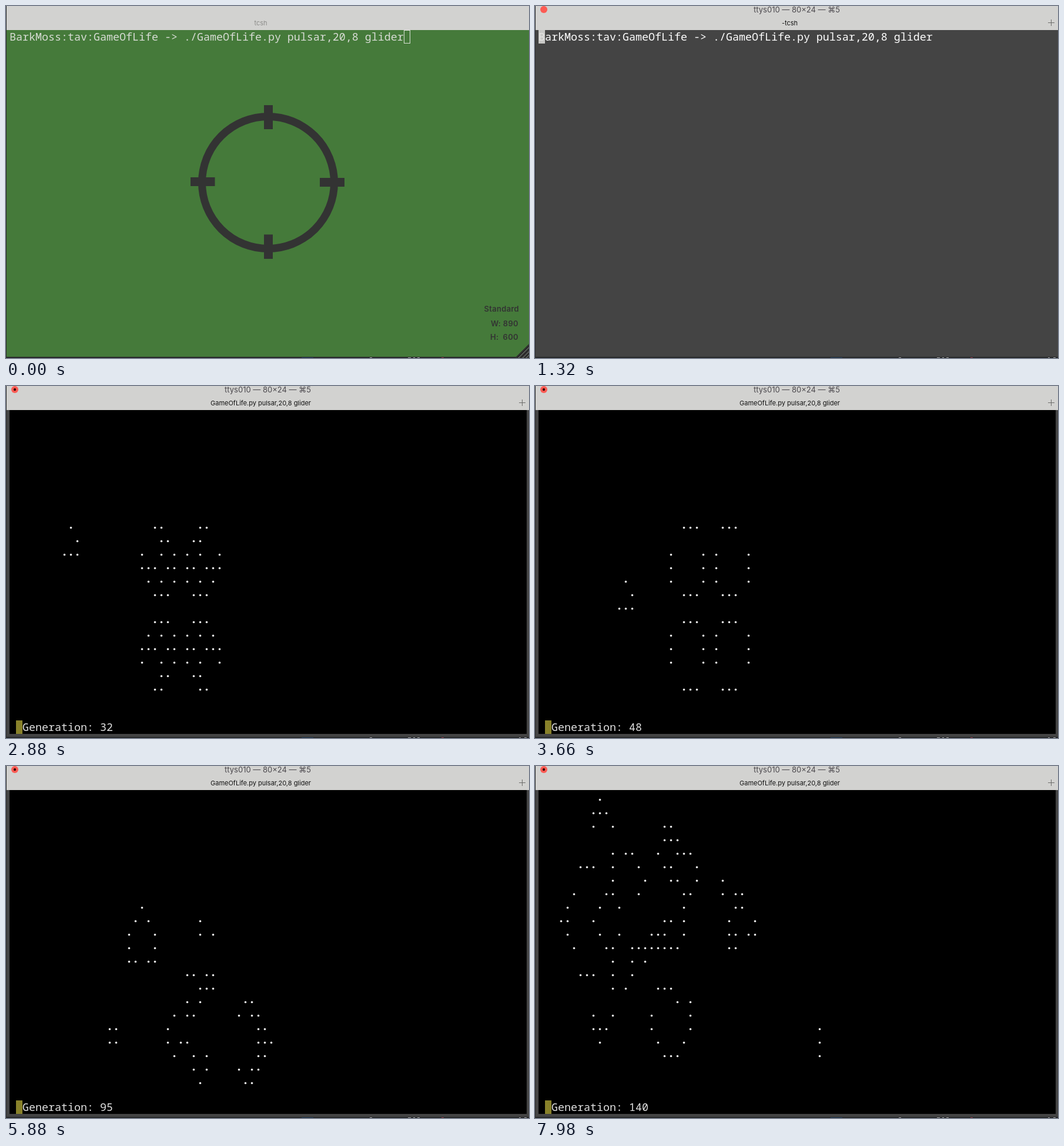
Write an HTML page that moves like this. It is 890 px wide and 600 px high and loops after 8000 ms.

```html
<!DOCTYPE html>
<html lang="en">
<head>
<meta charset="utf-8">
<title>Game of Life in a terminal</title>
<style>
  html, body { margin: 0; width: 100%; height: 100%; overflow: hidden; background: #444; }
  svg { display: block; width: 890px; height: 600px; }
  .mono { font: 500 18.333px "Noto Sans Mono", monospace; fill: #fff; }
  .ui { font: 400 11px Inter, sans-serif; text-anchor: middle; fill: #111; }
  .size { font: 600 13px Inter, sans-serif; text-anchor: end; fill: #333; letter-spacing: .3px; }
  #cells { fill: none; stroke: #e6e6e6; stroke-width: 3.7; stroke-linecap: round; }
  #title { font-size: 13px; fill: #4c494e; }
  .idle #title { fill: #a9a9a7; }
  .idle #tab { fill: #8b8b88; }
</style>
</head>
<body>
<svg id="stage" viewBox="0 0 890 600">
  <rect width="890" height="600" fill="#444"/>
  <rect id="green" width="890" height="600" fill="#457a3a"/>
  <rect y="598" width="890" height="2" fill="#26282a"/>
  <path d="M503 599.5h20" stroke="#24405f"/>
  <path d="M619 599.5h4M684 599.5h5m4 0h3m4 0h4M873 599.5h3m6 0h4" stroke="#aaa"/>
  <path d="M741 599.5h4" stroke="#963c4b"/>
  <rect width="1" height="600" fill="#292a29"/>
  <rect x="1" width="889" height="41" fill="#d2d2d0"/>

  <g id="bar">
    <text id="title" class="ui" x="445.500" y="11">ttys010 — 80×24 — ⌘5</text>
    <path d="M873 28.500h11M878.500 23v11" stroke="#6c6c6a"/>
  </g>
  <g id="light">
    <circle cx="15" cy="6" r="6" fill="#fc5b54"/>
    <circle id="busy" cx="15" cy="6" r="2.200" fill="#3d0704"/>
  </g>
  <text id="tab" class="ui" x="433.500" y="33"></text>

  <g id="overlay">
    <circle cx="446" cy="301" r="112.500" fill="none" stroke="#333" stroke-width="13"/>
    <path d="M439 169h15v41h-15zM439 389.500h15v41.500h-15zM314 292h41.500v15h-41.500zM534 293h42v15h-42z" fill="#333"/>
    <text class="size" x="873" y="521">Standard</text>
    <text class="size" x="872" y="546">W: 890</text>
    <text class="size" x="872" y="569">H:&#160; 600</text>
    <path d="M866 600l24-24v24z" fill="#2d2d2d"/>
    <path d="M872 600l18-18M879 600l11-11M885 600l5-5" stroke="#8a938a"/>
  </g>

  <g id="shell" class="mono">
    <rect id="cursor" y="41" width="11" height="23" fill="#c8c8c6"/>
    <rect id="hollow" x="677.500" y="41.500" width="10" height="22" fill="none" stroke="#d9e2d5"/>
    <text id="prompt" x="6" y="59"><tspan id="first">B</tspan>arkMoss:tav:GameOfLife -&gt; ./GameOfLife.py pulsar,20,8 glider</text>
  </g>

  <g id="game">
    <rect x="6" y="41" width="880" height="552" fill="#000"/>
    <path id="cells"/>
    <rect x="17" y="570" width="11" height="23" fill="#88812a"/>
    <text id="count" class="mono" x="28" y="588" style="fill:#e2e2e2"></text>
  </g>
</svg>
<script>
const LOOP = 8000, STEP = 60, COLS = 80, ROWS = 23, LAST = 140;
const FOCUS = 540, READY = 600, ENTER = 1320, RUN = 1440;
const $ = id => document.getElementById(id);
const show = (id, on) => { $(id).style.display = on ? "" : "none"; };
const at = (c, r) => (r + ROWS) % ROWS * COLS + (c + COLS) % COLS;

function seed() {
  const grid = new Uint8Array(COLS * ROWS);
  for (const [c, r] of [[1, 0], [2, 1], [0, 2], [1, 2], [2, 2]]) grid[at(c, r)] = 1;
  // Pulsar: bars of three on four lines, in both directions
  for (const line of [0, 5, 7, 12])
    for (const k of [2, 3, 4, 8, 9, 10])
      grid[at(20 + k, 8 + line)] = grid[at(20 + line, 8 + k)] = 1;
  return grid;
}

function evolve(grid) {
  return grid.map((alive, i) => {
    const c = i % COLS, r = Math.floor(i / COLS);
    let n = -alive;
    for (let y = -1; y < 2; y++)
      for (let x = -1; x < 2; x++) n += grid[at(c + x, r + y)];
    return n === 3 || (n === 2 && alive) ? 1 : 0;
  });
}

function dots(grid) {
  let d = "";
  grid.forEach((alive, i) => {
    if (alive) d += `M${11.5 + i % COLS * 11} ${57.5 + Math.floor(i / COLS) * 23}h0`;
  });
  return d;
}

const history = [];
for (let grid = seed(); history.length <= LAST; grid = evolve(grid)) history.push(dots(grid));

function draw(t) {
  const intro = t < STEP, running = t >= RUN, entered = t >= ENTER;
  $("stage").classList.toggle("idle", t < FOCUS);
  show("green", intro);
  show("overlay", intro);
  show("bar", !intro);
  show("light", t >= FOCUS);
  show("busy", running);
  show("shell", !running);
  show("game", running);
  $("tab").textContent = running ? "GameOfLife.py pulsar,20,8 glider" : intro ? "tcsh" : "-tcsh";
  show("hollow", t < READY);
  show("cursor", t >= READY);
  $("cursor").setAttribute("x", entered ? 6 : 677);
  $("first").style.fill = entered ? "#e4e4e2" : "";
  $("prompt").style.fill = intro ? "#d8dcd5" : "";
  if (running) {
    const gen = Math.min(LAST, Math.floor(16.05 + (t - 2100) * 124 / 5880));
    $("cells").setAttribute("d", history[gen]);
    $("count").textContent = "Generation: " + gen;
  }
}

const start = performance.now();
let shown = -1;
function tick() {
  const t = Math.floor((performance.now() - start) % LOOP / STEP) * STEP;
  if (t !== shown) draw(shown = t);
  requestAnimationFrame(tick);
}
tick();
</script>
</body>
</html>
```
